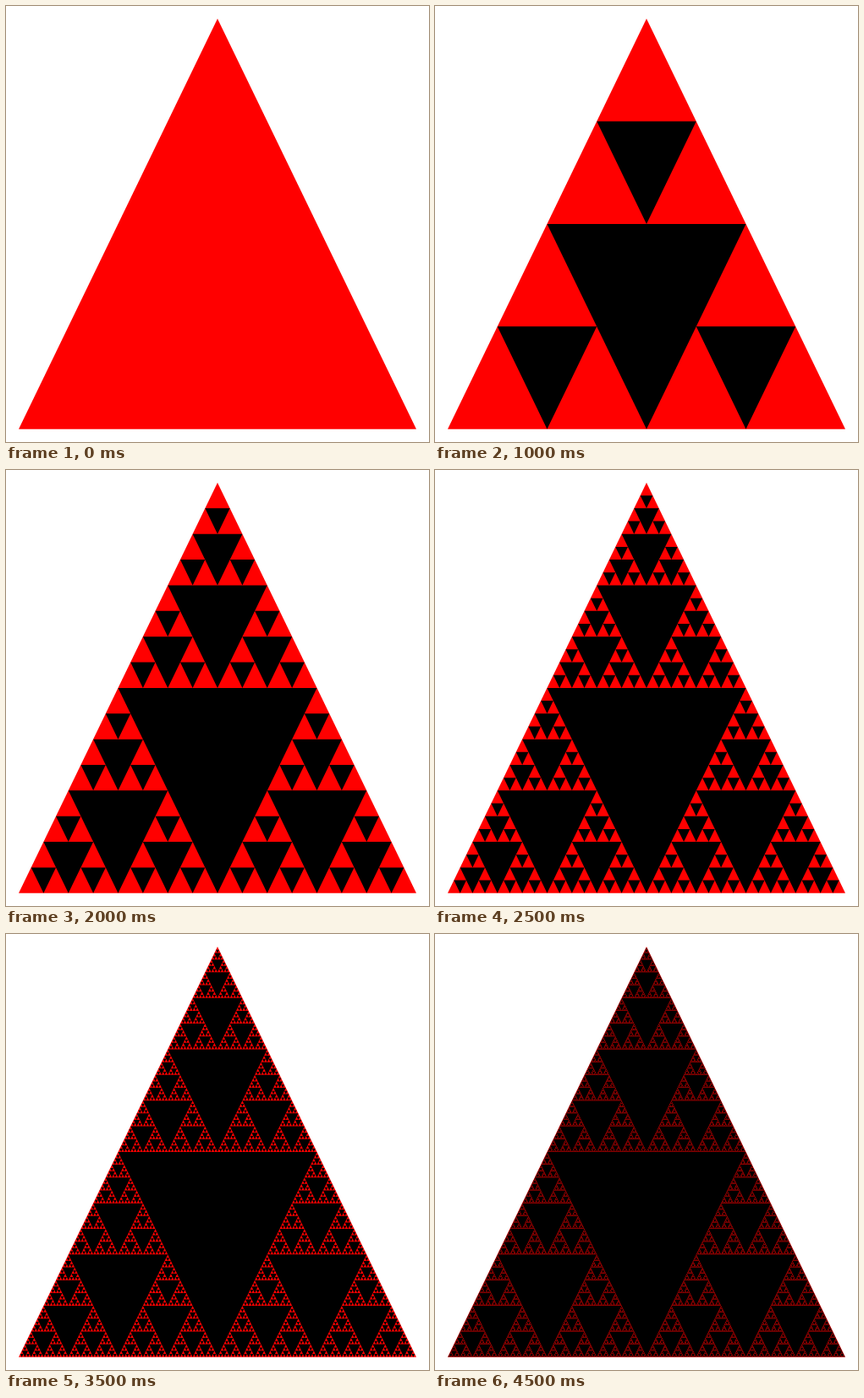
An HTML page with a canvas that plays this animation: 500 px wide and 516 px high, repeating every 5 s.

```html
<!DOCTYPE html>
<html lang="en">
<head>
<meta charset="utf-8">
<title>Sierpinski triangle</title>
<style>
  html, body { margin: 0; width: 100%; height: 100%; overflow: hidden; background: #fff; }
  canvas { display: block; }
</style>
</head>
<body>
<canvas id="stage" width="500" height="516"></canvas>
<script>
const ctx = document.getElementById("stage").getContext("2d");
const STEP = 500;
const STEPS = 10;
const outer = [[250, 15], [15, 500.8], [485, 500.8]];

const midpoint = (p, q) => [(p[0] + q[0]) / 2, (p[1] + q[1]) / 2];

function addTriangle([a, b, c]) {
  ctx.moveTo(...a);
  ctx.lineTo(...b);
  ctx.lineTo(...c);
  ctx.closePath();
}

function fillTriangles(triangles, color) {
  ctx.fillStyle = color;
  ctx.beginPath();
  triangles.forEach(addTriangle);
  ctx.fill();
}

function draw(depth) {
  ctx.fillStyle = "#fff";
  ctx.fillRect(0, 0, 500, 516);
  fillTriangles([outer], "#f00");

  let solid = [outer];
  for (let level = 0; level < depth; level++) {
    const holes = [];
    const next = [];
    for (const [a, b, c] of solid) {
      const ab = midpoint(a, b), bc = midpoint(b, c), ca = midpoint(c, a);
      holes.push([ab, bc, ca]);
      next.push([a, ab, ca], [ab, b, bc], [ca, bc, c]);
    }
    fillTriangles(holes, "#000");
    solid = next;
  }
}

const start = performance.now();
let shown = -1;

function frame() {
  const depth = Math.floor((performance.now() - start) / STEP) % STEPS;
  if (depth !== shown) {
    draw(depth);
    shown = depth;
  }
  requestAnimationFrame(frame);
}
frame();
</script>
</body>
</html>
```
